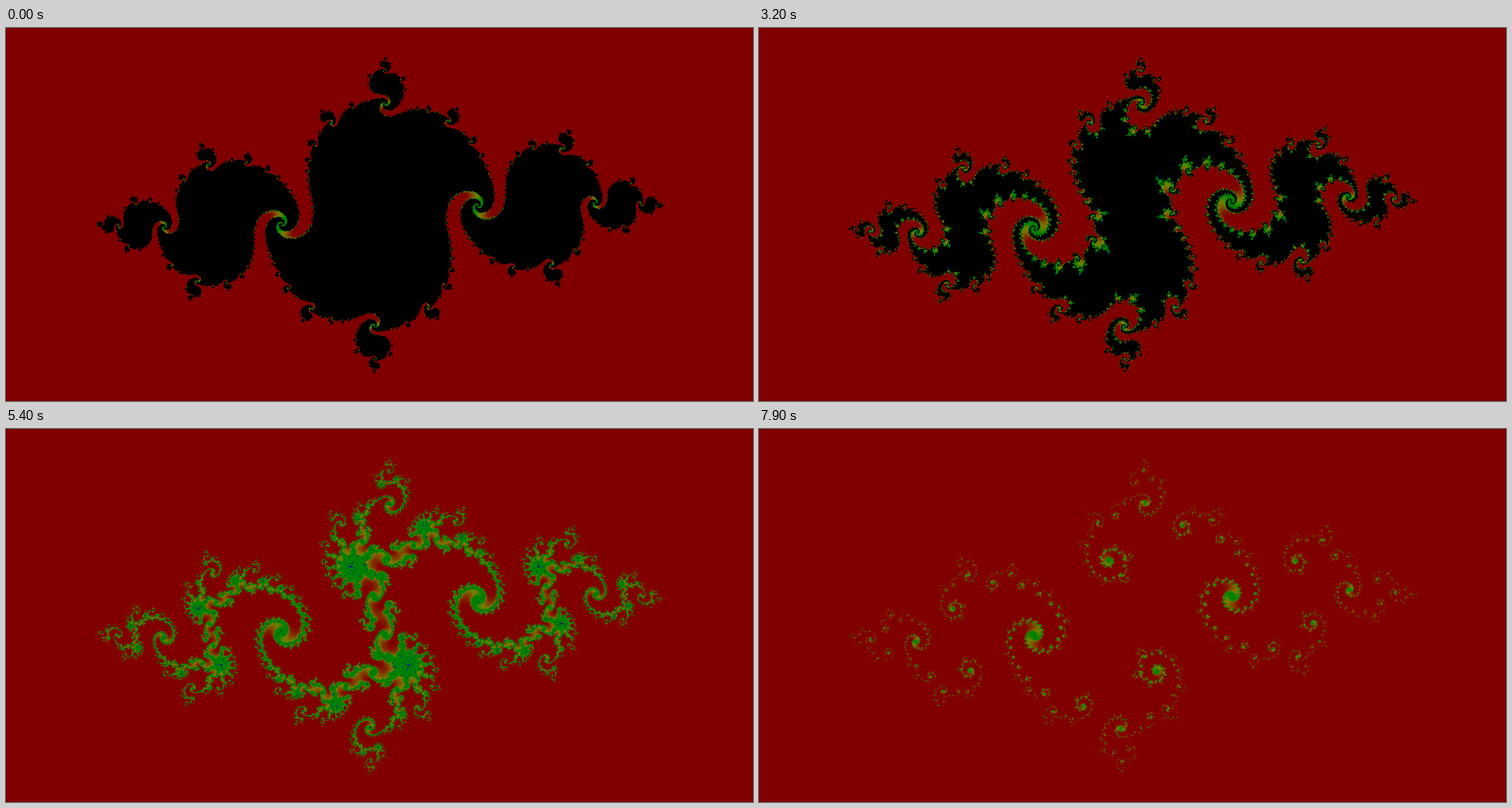
These frames come from a looping animation (1024 by 512 pixels, 8 s). An HTML page with a canvas:

```html
<!DOCTYPE html>
<html>
<head>
<meta charset="utf-8">
<title>Julia set</title>
<style>
  html, body { margin: 0; height: 100%; overflow: hidden; background: #800000; }
  canvas { display: block; width: 1024px; height: 512px; }
</style>
</head>
<body>
<canvas id="stage" width="1024" height="512"></canvas>
<script>
const W = 1024, H = 512, UNIT = 256;
const MAX_ITER = 280, HUE_CYCLE = 240;
const STEP_MS = 100, STEPS = 80;
const ctx = document.getElementById('stage').getContext('2d');
const image = ctx.createImageData(W, H);
const pixels = new Uint32Array(image.data.buffer);

// One channel of a half-bright colour wheel with broad plateaus:
// full near its own primary, fading quickly about a sixth of a turn away.
function channel(turn, primary) {
  const away = Math.abs(turn - primary) % 1;
  const sextants = 6 * Math.min(away, 1 - away);
  const f = Math.min(1, Math.max(0, (1.22 - sextants) / 0.26));
  return Math.round(128 * f * f * (3 - 2 * f));
}

function colourAt(n) {
  if (n >= MAX_ITER) return 0xff000000;
  const [r, g, b] = [0, 1 / 3, 2 / 3].map(p => channel(n / HUE_CYCLE, p));
  return (0xff000000 | b << 16 | g << 8 | r) >>> 0;
}
const palette = Uint32Array.from({ length: MAX_ITER + 1 }, (_, n) => colourAt(n));

function escapeCount(x, y, cx, cy) {
  let n = 0, xx = x * x, yy = y * y;
  while (n < MAX_ITER && xx + yy <= 4) {
    y = 2 * x * y + cy;
    x = xx - yy + cx;
    xx = x * x;
    yy = y * y;
    n++;
  }
  return n;
}

// The set is symmetric under z -> -z, so half the plane is enough.
function drawJulia(cx, cy) {
  const centre = H / 2 * W + W / 2;
  for (let i = 0; i <= centre; i++) {
    const x = (i % W - W / 2) / UNIT;
    const y = ((i / W | 0) - H / 2) / UNIT;
    const colour = palette[escapeCount(x, y, cx, cy)];
    pixels[i] = colour;
    const mirror = 2 * centre - i;
    if (mirror < pixels.length) pixels[mirror] = colour;
  }
  ctx.putImageData(image, 0, 0);
}

let shown = -1;
function tick() {
  const step = Math.floor(performance.now() / STEP_MS) % STEPS;
  if (step !== shown) {
    shown = step;
    drawJulia(-0.8, 0.1 + 0.0015 * step);
  }
  requestAnimationFrame(tick);
}
tick();
</script>
</body>
</html>
```
